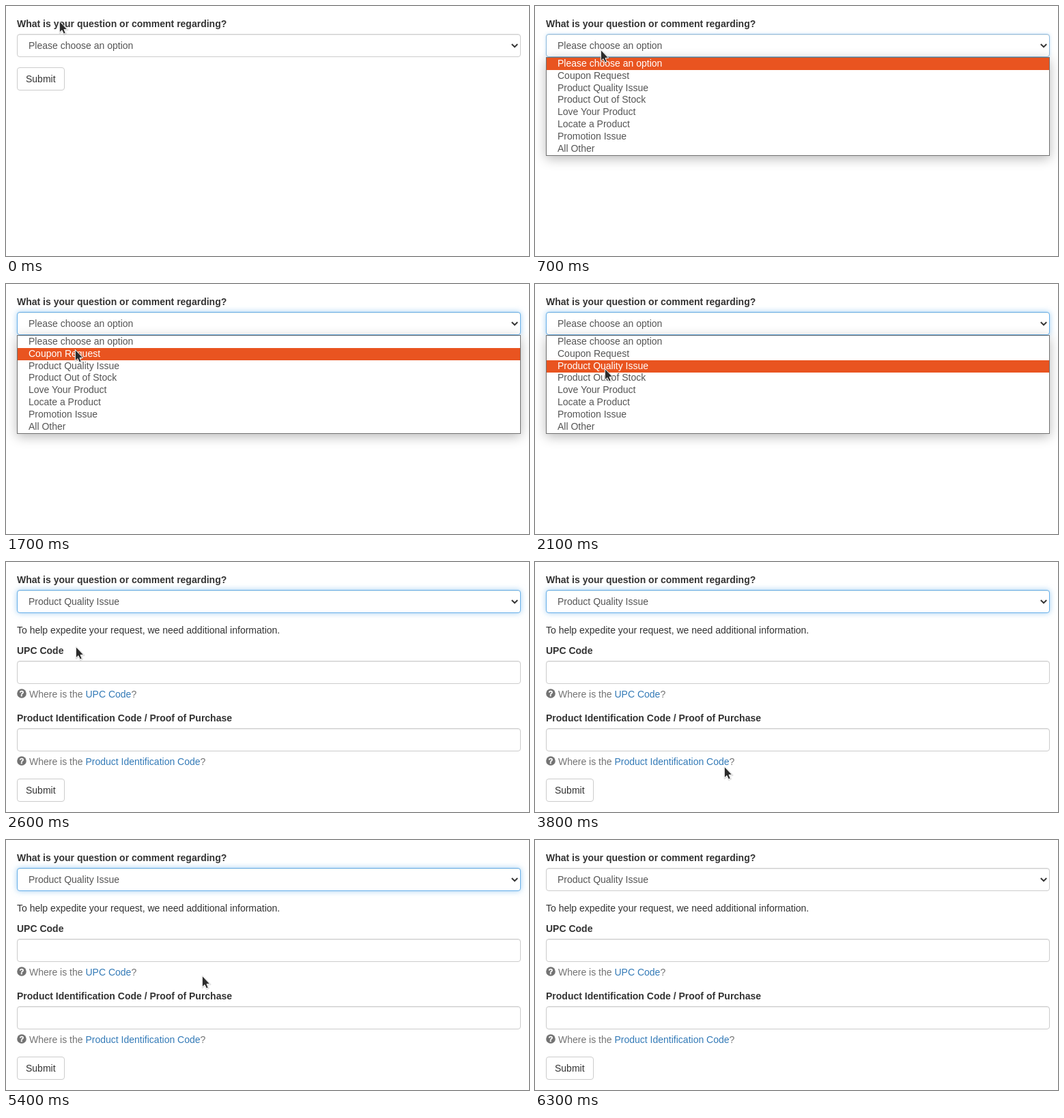
An HTML page that plays this animation: 766 px wide and 367 px high, repeating every 6400 ms.

```html
<!DOCTYPE html>
<html lang="en">
<head>
<meta charset="utf-8">
<title>Contact form</title>
<style>
  html, body { margin: 0; width: 100%; height: 100%; overflow: hidden; background: #fff; }
  body { position: relative; font: 14px/20px "Liberation Sans", Arial, sans-serif; color: #333; }
  div, svg { position: absolute; box-sizing: border-box; }
  div { white-space: pre; }
  .label { left: 16px; font-weight: bold; }
  .field {
    left: 16px; width: 738px; height: 34px; padding: 6px 16px; color: #555;
    border: 1px solid #ccc; border-radius: 4px; background: #fff;
    box-shadow: inset 0 1px 1px rgba(0, 0, 0, .075);
  }
  .help { left: 34px; color: #737373; }
  .help span { color: #337ab7; }
  .button {
    left: 16px; width: 70px; height: 34px; padding: 6px 12px;
    border: 1px solid #ccc; border-radius: 4px; background: #fff;
  }
  #menu {
    left: 16px; top: 75px; width: 738px; height: 145px; color: #555;
    border: 1px solid #707070; background: #fff;
    box-shadow: 0 4px 16px rgba(0, 0, 0, .28);
  }
  #hot { left: 0; width: 736px; height: 18px; background: #e95420; }
  .option { left: 16px; }
  #pointer { left: -.7px; top: -.5px; overflow: visible; }
</style>
</head>
<body>
<div class="label" style="top:16px">What is your question or comment regarding?</div>
<div class="field" id="select" style="top:41px"></div>
<svg style="left:738px;top:52px" width="14" height="12">
  <path d="M2.8 4 L7 8.2 L11.2 4" fill="none" stroke="#333" stroke-width="2"/>
</svg>

<div id="details">
  <div style="left:16px;top:90px">To help expedite your request, we need additional information.</div>
  <div class="label" style="top:120px">UPC Code</div>
  <div class="field" style="top:145px"></div>
  <div class="help" style="top:184px">Where is the <span>UPC Code</span>?</div>
  <div class="label" style="top:219px">Product Identification Code / Proof of Purchase</div>
  <div class="field" style="top:244px"></div>
  <div class="help" style="top:283px">Where is the <span>Product Identification Code</span>?</div>
  <svg style="left:16px;top:186px" width="14" height="120">
    <g id="mark">
      <circle cx="7" cy="7" r="6.8" fill="#737373"/>
      <text x="7" y="11" text-anchor="middle" font-size="11.5" font-weight="bold" fill="#fff" stroke="#fff" stroke-width=".4">?</text>
    </g>
    <use href="#mark" y="99"/>
  </svg>
</div>

<div class="button" id="submit">Submit</div>
<div id="menu"><div id="hot"></div></div>

<svg id="pointer" width="14" height="22">
  <path id="arrow" d="M.3 .3 V17 L4 13.6 L6.5 19 L9.3 17.8 L7 12.4 H11.8 Z" fill="#2b2b2b" stroke="#fff" stroke-linejoin="round"/>
</svg>

<script>
const LOOP = 6400, TICK = 100;
const OPEN = 7, CHOOSE = 26, LEAVE = 58, BLUR = 63;
const CIRCLE_FROM = 33, CIRCLE_TO = 50;
const ROW = 17.8;
const names = ["Please choose an option", "Coupon Request", "Product Quality Issue",
  "Product Out of Stock", "Love Your Product", "Locate a Product", "Promotion Issue", "All Other"];

// Straight glides between stops; the pointer rests where two stops agree
const stops = [
  { t: 0, x: 79, y: 22 },
  { t: 2, x: 81, y: 49 },
  { t: 4, x: 97, y: 64 },
  { t: 14, x: 97, y: 64 },
  { t: 17, x: 102, y: 96 },
  { t: 21, x: 103, y: 124 },
  { t: CIRCLE_FROM - 1, x: 103, y: 124 },
  { t: CIRCLE_TO, ...circle(CIRCLE_TO) },
  { t: 54, x: 288, y: 199 },
  { t: LEAVE - 1, x: 84, y: 6 }
];

// Sweeps round the newly shown fields
function circle(tick) {
  const a = (45 - 33 * (tick - 38)) * Math.PI / 180;
  return { x: 198 + 113 * Math.cos(a), y: 232 + 96 * Math.sin(a) };
}

function pointerAt(tick) {
  if (tick >= CIRCLE_FROM && tick <= CIRCLE_TO) return circle(tick);
  const i = stops.findIndex(s => s.t > tick);
  if (i < 0) return stops[stops.length - 1];
  const a = stops[i - 1], b = stops[i];
  const k = (tick - a.t) / (b.t - a.t);
  return { x: a.x + (b.x - a.x) * k, y: a.y + (b.y - a.y) * k };
}

const el = id => document.getElementById(id);
const [select, details, submit, menu, hot, pointer] =
  ["select", "details", "submit", "menu", "hot", "pointer"].map(el);

// Soft shadow under the arrow
const shade = el("arrow").cloneNode();
shade.removeAttribute("id");
shade.setAttribute("style",
  "fill:none;stroke:#000;stroke-opacity:.12;stroke-width:2.4;transform:translate(.5px,.7px)");
pointer.prepend(shade);

const options = names.map((name, i) => {
  const row = document.createElement("div");
  row.className = "option";
  row.textContent = name;
  row.style.top = Math.round(ROW * i) - 2 + "px";
  menu.append(row);
  return row;
});

function setFocus(k) {
  const mix = (a, b) => Math.round(a + (b - a) * k);
  select.style.borderColor = `rgb(${mix(204, 102)},${mix(204, 175)},${mix(204, 233)})`;
  select.style.boxShadow =
    `inset 0 1px 1px rgba(0,0,0,.075), 0 0 ${8 * k}px rgba(102,175,233,${.6 * k})`;
}

const show = (node, on) => { node.style.display = on ? "block" : "none"; };

function draw(time) {
  const tick = Math.floor(time % LOOP / TICK);
  const { x, y } = pointerAt(tick);
  const chosen = tick >= CHOOSE;

  setFocus(tick < OPEN || tick >= BLUR ? 0 : tick === OPEN ? .6 : 1);
  select.textContent = names[chosen ? 2 : 0];
  show(details, chosen);
  submit.style.top = (chosen ? 318 : 90) + "px";

  show(menu, tick >= OPEN && !chosen);
  const active = Math.max(0, Math.min(names.length - 1, Math.floor((y - 76) / ROW)));
  hot.style.top = Math.round(ROW * active) + "px";
  options.forEach((row, i) => { row.style.color = i === active ? "#fff" : "#555"; });

  show(pointer, tick < LEAVE);
  pointer.style.transform = `translate(${Math.round(x)}px, ${Math.round(y)}px)`;
}

const start = performance.now();
function loop() {
  draw(performance.now() - start);
  requestAnimationFrame(loop);
}
loop();
</script>
</body>
</html>
```
